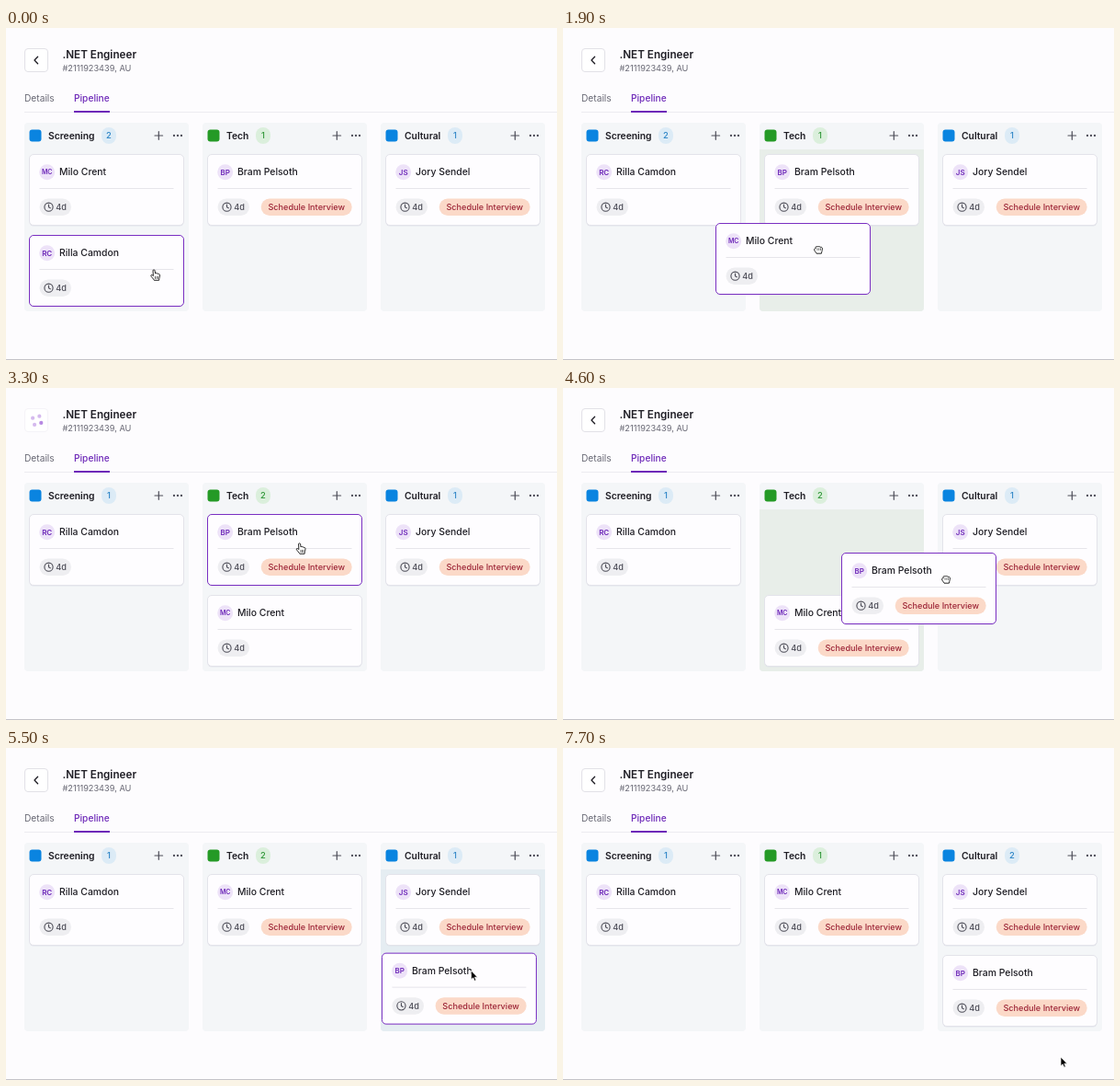
An HTML page for the animation above (7800 ms loop, 600 by 361 pixels).

```html
<!DOCTYPE html>
<html lang="en">
<head>
<meta charset="utf-8">
<title>Hiring pipeline</title>
<style>
  html, body { margin: 0; width: 100%; height: 100%; overflow: hidden; background: #fdfcfe; }
  svg { display: block; width: 600px; height: 361px; }
  text { font-family: Inter, "Liberation Sans", sans-serif; }
</style>
</head>
<body>
<svg id="stage" viewBox="0 0 600 361"></svg>
<script>
const LOOP = 7800, STEP = 100;
const PURPLE = '#6d28b8', INK = '#1e1d24', GREY = '#686874';
const CARD_W = 169, CARD_H = 78, SLOT_Y = [137, 225];

const columns = [
  { x: 20, title: 'Screening', pill: 84, color: '#0a84e0', tint: '#dcebf6', ink: '#2b84c6', glow: '#e5edf2' },
  { x: 214, title: 'Tech', pill: 58, color: '#259a26', tint: '#dbefdc', ink: '#2e9636', glow: '#e8eee9' },
  { x: 408, title: 'Cultural', pill: 73, color: '#0a84e0', tint: '#dcebf6', ink: '#2b84c6', glow: '#e5edf2' }
];

const people = [
  { name: 'Rilla Camdon', mark: 'RC', badgeAt: Infinity },
  { name: 'Jory Sendel', mark: 'JS', badgeAt: 0 },
  { name: 'Milo Crent', mark: 'MC', badgeAt: 3700 },
  { name: 'Bram Pelsoth', mark: 'BP', badgeAt: 0 }
];
const [RILLA, JORY, MILO, BRAM] = [0, 1, 2, 3];

const drags = [
  { who: MILO, grab: 1300, move: 1500, drop: 2400, end: 2700, dx: 112, dy: 29, from: [0, 0], to: [1, 1] },
  { who: BRAM, grab: 4200, move: 4300, drop: 5400, end: 5700, dx: 114, dy: 29, from: [1, 0], to: [2, 1] }
];
// column, start, end
const glows = [[0, 1200, 1700], [1, 1700, 2700], [1, 4100, 4700], [2, 4700, 5700]];
const saves = [[2900, 3700], [5800, 6600]];

const ease = {
  lin: p => p,
  out: p => 1 - (1 - p) ** 2,
  soft: p => p * p * (3 - 2 * p),
  settle: p => 1 - (1 - p) ** 4
};
// time, x, y, easing towards this point
const route = [
  [0, 161, 263], [200, 161, 263, 'lin'], [900, 136, 166, 'soft'], [1300, 136, 166, 'lin'],
  [1400, 144, 171, 'lin'], [1900, 278, 241, 'lin'], [2400, 326, 254, 'out'], [2700, 326, 254, 'lin'],
  [3300, 319.5, 169, 'soft'], [3900, 333, 166, 'soft'], [4200, 333, 166, 'lin'], [4300, 340, 170, 'lin'],
  [4600, 417, 208, 'lin'], [5400, 506.5, 242, 'out'], [6500, 506.5, 242, 'lin'], [7200, 542, 336, 'soft'],
  [LOOP, 542, 336, 'lin']
];

const clamp = v => Math.max(0, Math.min(1, v));
const mix = (a, b, p) => a + (b - a) * p;
const span = (t, a, b) => clamp((t - a) / (b - a));
const slot = (col, row) => [columns[col].x + 5, SLOT_Y[row]];

function cursorAt(t) {
  const i = route.findIndex((k, n) => n && t <= k[0]);
  const a = route[i - 1], b = route[i];
  const p = ease[b[3]](span(t, a[0], b[0]));
  return [mix(a[1], b[1], p), mix(a[2], b[2], p)];
}

// Markup helpers
const box = (x, y, w, h, r, fill, extra = '') =>
  `<rect x="${x}" y="${y}" width="${w}" height="${h}" rx="${r}" fill="${fill}" ${extra}/>`;
const dot = (x, y, r, fill, extra = '') => `<circle cx="${x}" cy="${y}" r="${r}" fill="${fill}" ${extra}/>`;
const line = (d, color, w = 1) =>
  `<path d="${d}" fill="none" stroke="${color}" stroke-width="${w}" stroke-linecap="round" stroke-linejoin="round"/>`;
const label = (s, x, mid, size, weight, fill, extra = '') =>
  `<text x="${x}" y="${mid + size * 0.364}" font-size="${size}" font-weight="${weight}" fill="${fill}" ${extra}>${s}</text>`;
const CENTER = 'text-anchor="middle"';

function header() {
  return box(20.5, 22.5, 25, 25, 3.5, '#fff', 'id="back" stroke="#e2e1e7"')
    + `<g id="chevron">${line('M34.6 31.2L31 35l3.6 3.8', INK, 1.3)}</g><g id="spinner"></g>`
    + label('.NET Engineer', 61.5, 29, 11.7, 600, INK)
    + label('#2111923439, AU', 61.5, 43.7, 9.2, 400, GREY)
    + label('Details', 20, 76.5, 10.2, 400, GREY)
    + label('Pipeline', 74, 76.5, 10.2, 500, PURPLE)
    + box(20, 91, 580, 1, 0, '#ecebf0') + box(74, 90, 39, 2, 0, PURPLE)
    + box(0, 360, 600, 1, 0, '#c4c3c8');
}

function column(c, i) {
  const dots = [163, 167, 171].map(x => dot(x, 14, 1.15, '#4c4c57')).join('');
  return `<g transform="translate(${c.x} 103)">`
    + box(0, 0, 179, 205, 4, '#f4f6f8')
    + `<path id="glow${i}" d="M0 29H179V201q0 4-4 4H4q-4 0-4-4Z" fill="${c.glow}"/>`
    + box(5.5, 7.5, 13, 13, 3, c.color)
    + label(c.title, 26, 14, 10.3, 600, INK)
    + box(c.pill, 5, 16, 18, 8, c.tint)
    + label('', c.pill + 8, 14, 9.4, 500, c.ink, `${CENTER} id="count${i}"`)
    + line('M142 14h8.6M146.3 9.7v8.6', '#4c4c57', 1.2) + dots + '</g>';
}

function card(p, i) {
  return `<g id="card${i}">`
    + box(0.5, 1.5, CARD_W - 1, CARD_H - 1, 4.5, '#dcdde5', 'opacity=".7"')
    + box(0.5, 0.5, CARD_W - 1, CARD_H - 1, 4.5, '#fefdff', `id="edge${i}"`)
    + dot(19.7, 19.7, 8.5, '#ede2f8')
    + label(p.mark, 19.7, 19.8, p.mark === 'MC' ? 7 : 8, 600, PURPLE, CENTER)
    + label(p.name, 33, 19.3, 10.4, 500, INK)
    + box(11.5, 37, 146, 1, 0, '#e6e5ea')
    + box(11.5, 48.5, 34.5, 18.5, 9.2, '#eeeef1')
    + dot(21.5, 57.7, 4.6, 'none', 'stroke="#4c4c57" stroke-width="1.1"')
    + line('M21.5 55v2.8l1.8 1', '#4c4c57', 1.1)
    + label('4d', 29.2, 57.8, 9.2, 500, '#4c4c57')
    + `<g id="badge${i}">` + box(58.7, 48.5, 99, 18.5, 9.2, '#fbd9c8')
    + label('Schedule Interview', 108.2, 57.8, 9.15, 500, '#9c2436', CENTER) + '</g></g>';
}

const shape = (id, d, fill, stroke, w, detail = '') =>
  `<g id="${id}"><path d="${d}" fill="${fill}" stroke="${stroke}" stroke-width="${w}" stroke-linejoin="round"/>${detail}</g>`;

function pointers() {
  return '<g id="pointer">'
    + shape('arrow', 'M0 0V9.8L2.2 7.8L3.7 11.2L5.3 10.5L3.9 7.2H6.9Z', '#000', '#fff', 0.7)
    + shape('hand', 'M-1 .8C-1-.5 1-.5 1.1 .8L1.6 4C1.8 3.2 3.4 3.3 3.5 4.2C3.8 3.6 5 3.8 5.1 4.7'
      + 'C5.6 4.3 6.5 4.6 6.5 5.5C6.5 8 5.8 8.6 5.6 11.3H.3C-.2 9.8-2.6 8-3.2 6.4C-3.4 5.3-1.9 5.1-.6 6.6Z',
      '#fff', '#111', 0.9, line('M1.4 7.3v2.2M3 7.3v2.2M4.5 7.3v2.2', '#111', 0.6))
    + shape('fist', 'M-2.9-1.2V-2.6C-2.7-3.7-1.2-3.6-1-2.9C-.6-3.8 .7-3.7 1-2.9C1.5-3.6 2.6-3.3 2.8-2.4'
      + 'C3.4-2.9 4.4-2.5 4.4-1.4C4.4 1.5 3.7 1.9 3.4 4.2H-2C-2.5 2.7-4.3 1.5-4.4 0C-4.3-1-3.4-1.4-2.9-1.2Z',
      '#fff', '#111', 0.9, line('M-1-1.2v1.6M.8-1.2v1.6M2.5-1.2v1.6', '#111', 0.6))
    + '</g>';
}

const stage = document.getElementById('stage');
stage.innerHTML = box(0, 0, 600, 361, 0, '#fdfcfe') + header()
  + columns.map(column).join('') + people.map(card).join('') + pointers();
const el = {};
stage.querySelectorAll('[id]').forEach(n => el[n.id] = n);
const show = (id, on) => el[id].setAttribute('visibility', on ? 'visible' : 'hidden');
const move = (id, [x, y]) => el[id].setAttribute('transform', `translate(${x} ${y})`);

function dragged(d, t, cursor) {
  if (t < d.move) return slot(...d.from);
  const end = slot(...d.to);
  if (t >= d.end) return end;
  const [x, y] = t < d.drop ? cursor : cursorAt(d.drop);
  const p = ease.settle(span(t, d.drop, d.end));
  return [mix(x - d.dx, end[0], p), mix(y - d.dy, end[1], p)];
}

function places(t, cursor) {
  const at = [];
  at[RILLA] = [25, mix(SLOT_Y[1], SLOT_Y[0], ease.out(span(t, 1600, 1900)))];
  at[JORY] = slot(2, 0);
  drags.forEach(d => at[d.who] = dragged(d, t, cursor));
  // The remaining card closes the gap left above it.
  if (t >= 4700) at[MILO] = [219, mix(SLOT_Y[1], SLOT_Y[0], ease.out(span(t, 4700, 5000)))];
  return at;
}

function drawSpinner(t) {
  const save = saves.find(s => t >= s[0] && t < s[1]);
  show('chevron', !save);
  el.back.setAttribute('stroke', save ? '#f5f3f8' : '#e2e1e7');
  if (!save) { el.spinner.innerHTML = ''; return; }
  const e = (t - save[0]) / 1000;
  el.spinner.innerHTML = [0, 1, 2, 3].map(i => {
    const a = (i / 4 - 0.25 + e / 1.2) * 2 * Math.PI;
    const p = Math.max(0, e - i * 0.4) % 2;
    const glow = 0.36 + 0.64 * (1 - Math.abs(1 - p));
    return dot(33.7 + 5.3 * Math.cos(a), 35.3 + 5.3 * Math.sin(a), 2.1, '#8a3fd0', `opacity="${glow}"`);
  }).join('');
}

function draw(t) {
  const cursor = cursorAt(t), at = places(t, cursor);
  const active = drags.find(d => t >= d.grab && t < d.end);
  const inside = ([x, y]) => cursor[0] >= x && cursor[0] <= x + CARD_W && cursor[1] >= y && cursor[1] <= y + CARD_H;
  const hover = active ? active.who : at.findIndex(inside);
  const mode = active ? (t < active.drop ? 'fist' : 'arrow') : hover >= 0 ? 'hand' : 'arrow';

  people.forEach((p, i) => {
    move('card' + i, at[i]);
    el['edge' + i].setAttribute('stroke', i === hover ? '#7a2fc2' : '#e3e3ea');
    show('badge' + i, t >= p.badgeAt);
  });
  const top = el['card' + (t < 4100 ? MILO : BRAM)];
  if (top.nextElementSibling !== el.pointer) stage.insertBefore(top, el.pointer);

  const first = t >= drags[0].end, second = t >= drags[1].end;
  [first ? 1 : 2, first && !second ? 2 : 1, second ? 2 : 1].forEach((n, i) => {
    el['count' + i].textContent = n;
    const lit = glows.filter(g => g[0] === i).map(g => span(t, g[1], g[1] + 200) - span(t, g[2], g[2] + 200));
    el['glow' + i].setAttribute('opacity', Math.max(...lit));
  });

  drawSpinner(t);
  move('pointer', cursor);
  ['arrow', 'hand', 'fist'].forEach(id => show(id, id === mode));
}

const start = performance.now();
function tick(now) {
  const t = Math.max(0, now - start) % LOOP;
  draw(Math.floor(t / STEP) * STEP);
  requestAnimationFrame(tick);
}
draw(0);
requestAnimationFrame(tick);
</script>
</body>
</html>
```
